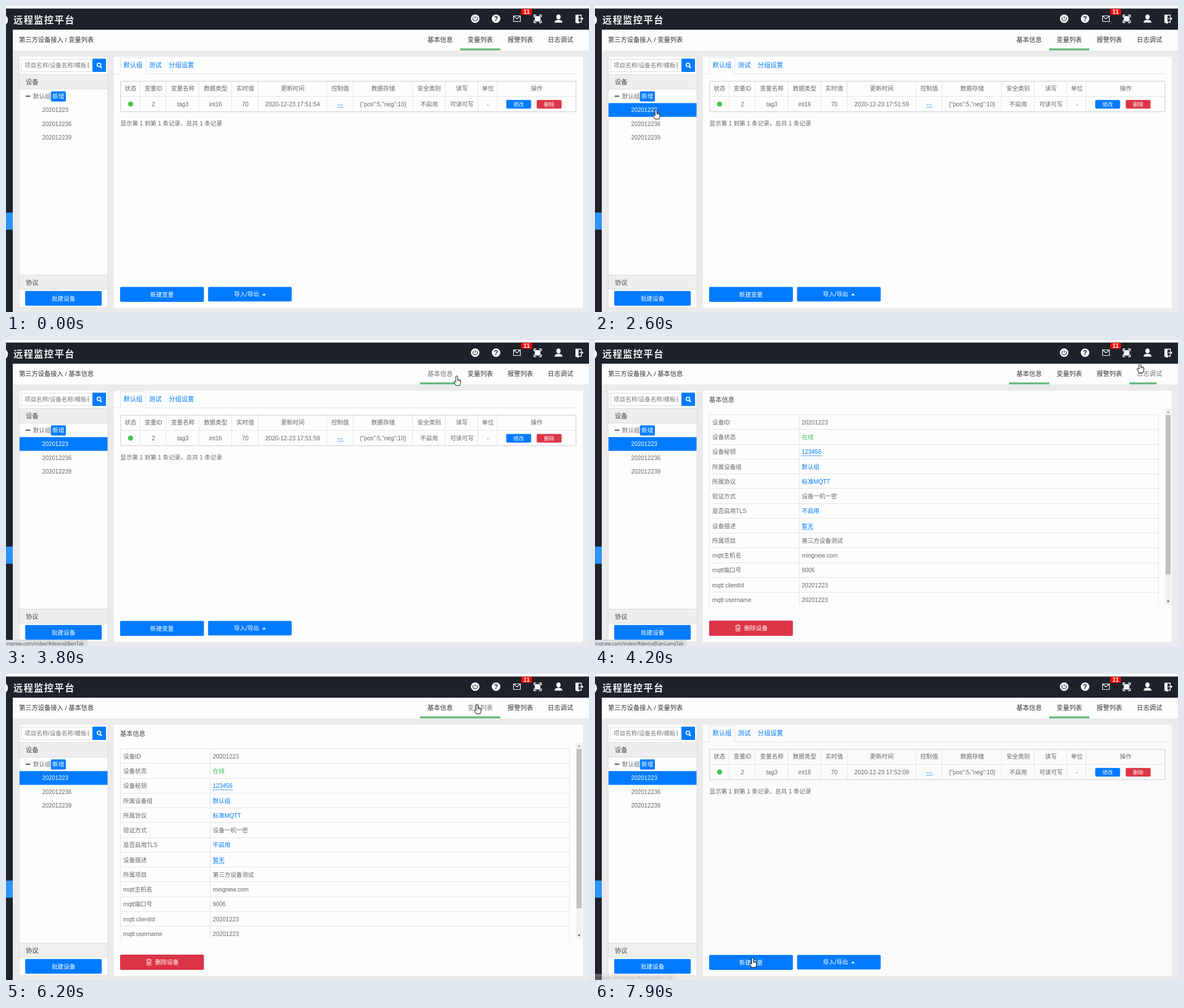
Write an HTML page that moves like this. It is 1032 px wide and 543 px high and loops after 8 s.

```html
<!DOCTYPE html>
<html lang="zh-CN">
<head>
<meta charset="utf-8">
<title>变量列表</title>
<style>
html, body { margin: 0; width: 100%; height: 100%; overflow: hidden; background: #ebebeb; }
svg { display: block; width: 1032px; height: 543px; }
text { font-family: "Liberation Sans", "Noto Sans CJK SC", "Noto Sans CJK", sans-serif; white-space: pre; }
.status text { font-family: "Noto Sans", sans-serif; }
</style>
</head>
<body>
<svg viewBox="0 0 1032 543">
  <defs>
    <clipPath id="searchClip"><rect x="28" y="95" width="119" height="22"/></clipPath>
    <clipPath id="infoClip"><rect x="200" y="122" width="800" height="349"/></clipPath>
  </defs>
  <g id="base"></g>
  <g id="live"></g>
</svg>
<script>
const BLUE = '#007bff', RED = '#dc3545', GREEN = '#5fb878', LINE = '#e1e5e9', DARK = '#1d222b';
const LOOP = 8000, STEP = 100;

const box = (x1, y1, x2, y2, fill, r = 0) =>
  `<rect x="${x1}" y="${y1}" width="${x2 - x1}" height="${y2 - y1}" rx="${r}" fill="${fill}"/>`;
const path = (d, stroke, width = 1, fill = 'none') =>
  `<path d="${d}" stroke="${stroke}" stroke-width="${width}" fill="${fill}"/>`;
const dot = (x, y, r, fill) => `<circle cx="${x}" cy="${y}" r="${r}" fill="${fill}"/>`;
// y is the optical middle of the text line
const label = (x, y, str, fill = '#666', size = 10.4, anchor = 'start', extra = '') =>
  `<text x="${x}" y="${y + size * .37}" font-size="${size}" fill="${fill}" text-anchor="${anchor}" ${extra}>${str}</text>`;
const button = (x1, y1, x2, y2, str, fill = BLUE, size = 10.4) =>
  box(x1, y1, x2, y2, fill, 2) + label((x1 + x2) / 2, (y1 + y2) / 2, str, '#fff', size, 'middle');
const dashes = (x1, x2, y) =>
  `<path d="M${x1} ${y}H${x2}" stroke="${BLUE}" stroke-dasharray="2 1"/>`;

function headerIcons() {
  return dot(830.5, 22.5, 7.6, '#fff') + path('M828 19.4a4 4 0 1 0 5 0M830.5 18v4.5', DARK, 1.1) +
    dot(867.5, 22.5, 7.6, '#fff') + label(867.5, 22.7, '?', DARK, 12, 'middle', 'font-weight="bold"') +
    path('M898.5 17.5h12v10h-12zl6 5.5 6-5.5', '#fff', 1.2) +
    box(936, 18, 946, 27.5, '#fff') +
    path('M934.7 20v-4h4M943.5 16h4v4M947.5 25.5v4h-4M938.7 29.5h-4v-4', '#fff', 1.5) +
    '<ellipse cx="978" cy="19.5" rx="3.8" ry="4.6" fill="#fff"/>' +
    path('M971 29.5q0-4 5-4.7h4q5 .7 5 4.7z', 'none', 0, '#fff') +
    path('M1008 15.5h11v4h-1.5v-2.5h-4v11h4v-2.5h1.5v4h-5v2l-6-2z', 'none', 0, '#fff') +
    path('M1015 22.5h6m-2.5-2.5 2.5 2.5-2.5 2.5', '#fff', 1.5) +
    box(912, 5, 931, 15.5, '#f00', 1.5) +
    label(921.5, 10.2, '11', '#fff', 11, 'middle', 'font-weight="bold"');
}

function sideHeading(y1, y2, str) {
  return box(24, y1, 180, y2, '#ddd') + box(24, y1 + 1, 180, y2 - 1, '#eee') +
    label(35, (y1 + y2) / 2 + .5, str, '#444', 11.2);
}

function basePage() {
  return box(0, 0, 1032, 543, '#ebebeb') + box(0, 0, 1032, 5, '#fff') +
    box(0, 4.5, 1032, 42, DARK) + box(0, 42, 12, 543, DARK) + box(0, 366.5, 12, 397, '#2d93fa') +
    dot(-7, 25, 10.5, '#fff') +
    label(13, 25, '远程监控平台', '#f0f0f0', 16.8, 'start', 'letter-spacing="1.4" font-weight="bold"') +
    headerIcons() + box(12, 42, 1032, 79, '#fdfdfd') +
    box(23, 90, 181, 536, '#ddd') + box(24, 90, 180, 535, '#fdfdfd') +
    box(27, 94, 153, 117, '#ddd') + box(28, 95, 153, 116, '#fff') +
    `<g clip-path="url(#searchClip)">${label(33, 105.5, '项目名称/设备名称/模板名称', '#777')}</g>` +
    box(153, 93.5, 177, 117, BLUE, 1) + path('M167 107.5l2.5 2.5', '#fff', 2) +
    '<circle cx="164.5" cy="104.5" r="3.2" stroke="#fff" stroke-width="1.7" fill="none"/>' +
    sideHeading(121, 148, '设备') + sideHeading(477, 503, '协议') +
    box(35, 159, 43, 161, '#555') + label(48, 160, '默认组') +
    button(79.5, 151.5, 106, 169.5, '新增') + button(34, 505.7, 169.5, 531.7, '批建设备');
}

const HEADS = ['状态', '变量ID', '变量名称', '数据类型', '实时值', '更新时间', '控制值', '数据存储', '安全类别', '读写', '单位', '操作'];
const EDGES = [203, 238, 284, 342, 400, 447, 568, 615, 720, 778, 836, 870, 1009];
const LOADING_EDGES = [203, 241, 291, 354, 417, 468, 531, 581, 695, 757, 822, 859, 1009];

function variableList(loading, stamp) {
  const edges = loading ? LOADING_EDGES : EDGES;
  const mid = i => (edges[i] + edges[i + 1]) / 2;
  const cells = ['', '2', 'tag3', 'int16', loading ? '' : '70', loading ? '' : stamp, '',
    '{"pos":5,"neg":10}', '不启用', '可读可写', '-', ''];
  let out = path('M191 120.5H202.5V91.5H247.5V120.5H1009', LINE) +
    label(208, 105, '默认组', BLUE, 11.2) + label(253, 105, '测试', BLUE, 11.2) + label(288, 105, '分组设置', BLUE, 11.2) +
    '<rect x="203" y="133.5" width="806" height="54" rx="1.5" fill="none" stroke="#d5d9dd" stroke-width="1.5"/>' +
    box(203, 160, 1009, 161, LINE);
  HEADS.forEach((head, i) => {
    if (i) out += box(edges[i] - 1, 134, edges[i], 187, LINE);
    out += label(mid(i), 146.5, head, '#666', 10.4, 'middle') + label(mid(i), 174, cells[i], '#666', 10.4, 'middle');
  });
  const control = mid(6), action = mid(11);
  out += dot(mid(0), 174, 4.6, loading ? '#555' : '#44c553') +
    label(control, 174.5, '---', BLUE, 10.4, 'middle') + dashes(control - 5, control + 6, 179.5) +
    button(action - 54, 166.7, action - 10, 182, '修改', BLUE, 9.2) +
    button(action, 166.7, action + 44, 182, '删除', RED, 9.2) +
    label(202.5, 208.5, '显示第 1 到第 1 条记录，总共 1 条记录') +
    button(202, 498.5, 350.3, 525, '新建变量') + box(357.7, 498.5, 505.7, 524.3, BLUE, 2) +
    label(403.5, 511.5, '导入/导出', '#fff') + path('M453.5 513.5l3.3-3.5 3.3 3.5z', 'none', 0, '#fff');
  return out;
}

const INFO = [['设备ID', '20201223'], ['设备状态', '在线', '#3fbf57'], ['设备秘钥', '123456', BLUE, 35],
  ['所属设备组', '默认组', BLUE], ['所属协议', '标准MQTT', BLUE], ['验证方式', '设备一机一密'],
  ['是否启用TLS', '不启用', BLUE], ['设备描述', '暂无', BLUE, 21], ['所属项目', '第三方设备测试'],
  ['mqtt主机名', 'mingnew.com'], ['mqtt端口号', '9006'], ['mqtt clientId', '20201223'], ['mqtt username', '20201223']];

function basicInfo() {
  let rows = '';
  INFO.forEach(([name, value, color, dashed], i) => {
    const y = 146 + i * 26.25, top = Math.round(y - 14);
    rows += box(202, top, 998, top + 1, LINE) + label(207.5, y, name) + label(366, y, value, color);
    if (dashed) rows += dashes(366, 366 + dashed, Math.round(y) + 6.5);
  });
  for (const x of [202, 361, 997]) rows += box(x, 132, x + 1, 471, LINE);
  return label(202, 105.5, '基本信息', '#444', 11.2) + `<g clip-path="url(#infoClip)">${rows}</g>` +
    box(1009, 122, 1020, 470, '#f1f1f1') + box(1010, 133, 1019, 416, '#c1c1c1') +
    path('M1012 129l2.5-3 2.5 3z', 'none', 0, '#999') + path('M1012 462.5l2.5 3 2.5-3z', 'none', 0, '#444') +
    box(202, 498, 350.3, 525, RED, 2) + label(264, 511.5, '删除设备', '#fff') +
    path('M248 507.5h10M251 507v-1.5h4v1.5M249.5 508v8.5h7V508M251.5 510v5M253 510v5M254.5 510v5', '#fff', .8);
}

function panel(t) {
  const loading = t === 4000 || t === 6700;
  const info = t >= 4000 && t < 6700;
  const stamp = '2020-12-23 ' + (t < 1700 ? '17:51:54' : t < 6700 ? '17:51:59' : '17:52:09');
  const back = loading ? '#f8f8f8' : t > 6700 ? '#fbfbfb' : '#fdfdfd';
  return box(191, 90, 1021, 536, back) +
    `<g opacity="${loading ? .5 : 1}">${info ? basicInfo() : variableList(loading, stamp)}</g>`;
}

const TABS = ['基本信息', '变量列表', '报警列表', '日志调试'];
const tabLeft = i => 733 + 71 * i;
const underline = (i, width) => box(tabLeft(i), 75.3, tabLeft(i) + width, 78.7, GREEN);
// [from, to, tab under the pointer]
const HOVERS = [[300, 400, 3], [3600, 3900, 0], [3900, 4000, 1], [4000, 4100, 2], [4100, 4300, 3],
  [5400, 5500, 3], [5900, 7400, 1], [7400, 7600, 0]];

function navigation(t) {
  const active = t >= 3800 && t < 6400 ? 0 : 1;
  const [from, , hovered] = HOVERS.find(([start, end]) => t >= start && t < end) || [];
  const grown = Math.min(1, (t - from + 50) / 220);
  let out = label(23, 60, '第三方设备接入 / ' + TABS[active], '#333', 11.2) + underline(active, 71);
  if (hovered !== undefined && hovered !== active) out += underline(hovered, 71 * grown);
  TABS.forEach((name, i) => {
    out += label(tabLeft(i) + 35.5, 60, name, hovered === i && grown > .5 ? '#777' : '#333', 11.2, 'middle');
  });
  return out;
}

function devices(t) {
  const picked = t >= 1800;
  const fill = picked ? BLUE : t >= 1700 ? '#f2f2f2' : 'none';
  return box(24, 172.3, 179.7, 196.7, fill) + label(64, 184.5, '20201223', picked ? '#fff' : '#666') +
    label(64, 209, '202012236') + label(64, 233.5, '202012239');
}

function statusBar(t) {
  const basic = (t >= 3600 && t < 3900) || t >= 7400;
  const list = (t >= 3900 && t < 4300) || (t >= 6400 && t < 7400);
  if (!basic && !list) return '';
  const width = basic ? 144 : 162;
  return `<g class="status" opacity="${t >= 7900 ? .35 : 1}">` + box(-4, 532, width, 547, '#c8cacd', 2) +
    box(-4, 533, width - 1, 547, '#dee1e6', 2) +
    label(0, 539, 'ingnew.com/index/#device' + (basic ? 'JiBenTab' : 'BianLiangTab'), '#555', 8.3) + '</g>';
}

// [time, x, y] of the pointer tip, one list per visit
const VISITS = [
  [[300, 985, 57], [500, 780, 180], [700, 449, 325], [800, 316, 408], [900, 286, 470], [1000, 253, 437],
    [1100, 146, 262], [1200, 134, 238], [1500, 108, 184], [2900, 108, 184], [3200, 330, 165],
    [3500, 708, 95], [3700, 790, 68], [3800, 798, 64], [3900, 822, 62], [4100, 935, 58], [4400, 1024, 8]],
  [[5400, 949, 69.5], [5600, 920, 86], [5800, 880, 86], [6000, 850, 66], [6200, 834, 54], [7300, 834, 54],
    [7500, 775, 66], [7700, 420, 360], [7900, 279, 504]]
];
const HAND = path('M-1.7 1.3a1.6 1.6 0 0 1 3.2 0V6l4 .9q1.8.5 1.6 2.6l-.6 4.1-1 3.1H-1.5L-4.9 11.3q-1-1.7.3-2.1 1.1-.2 2.9 1.6z', '#111', 1, '#fff') +
  path('M1.5 6v3M3.5 6.5v2.7M5.5 7v2.3', '#111', .7);
const ARROW = path('M0 0V14L3.3 11 5.5 16 7.8 15 5.6 10H10z', '#111', .9, '#fff');

function pointer(t) {
  const visit = VISITS.find(v => t >= v[0][0] && t <= v[v.length - 1][0]);
  if (!visit) return '';
  const i = Math.max(1, visit.findIndex(key => key[0] >= t));
  const [t0, x0, y0] = visit[i - 1], [t1, x1, y1] = visit[i];
  const k = (t - t0) / (t1 - t0), x = x0 + (x1 - x0) * k, y = y0 + (y1 - y0) * k;
  const hand = (t >= 1500 && t <= 2900) || (x > 733 && y < 79) || y > 498;
  return `<g transform="translate(${x} ${y})" stroke-linejoin="round">${hand ? HAND : ARROW}</g>`;
}

const live = document.getElementById('live');
document.getElementById('base').innerHTML = basePage();
let shown = -1;

function draw(now) {
  const t = Math.floor(now % LOOP / STEP) * STEP;
  if (t !== shown) {
    shown = t;
    live.innerHTML = panel(t) + navigation(t) + devices(t) + statusBar(t) + pointer(t);
  }
}
const start = performance.now();
const tick = () => { draw(performance.now() - start); requestAnimationFrame(tick); };
tick();
</script>
</body>
</html>
```
